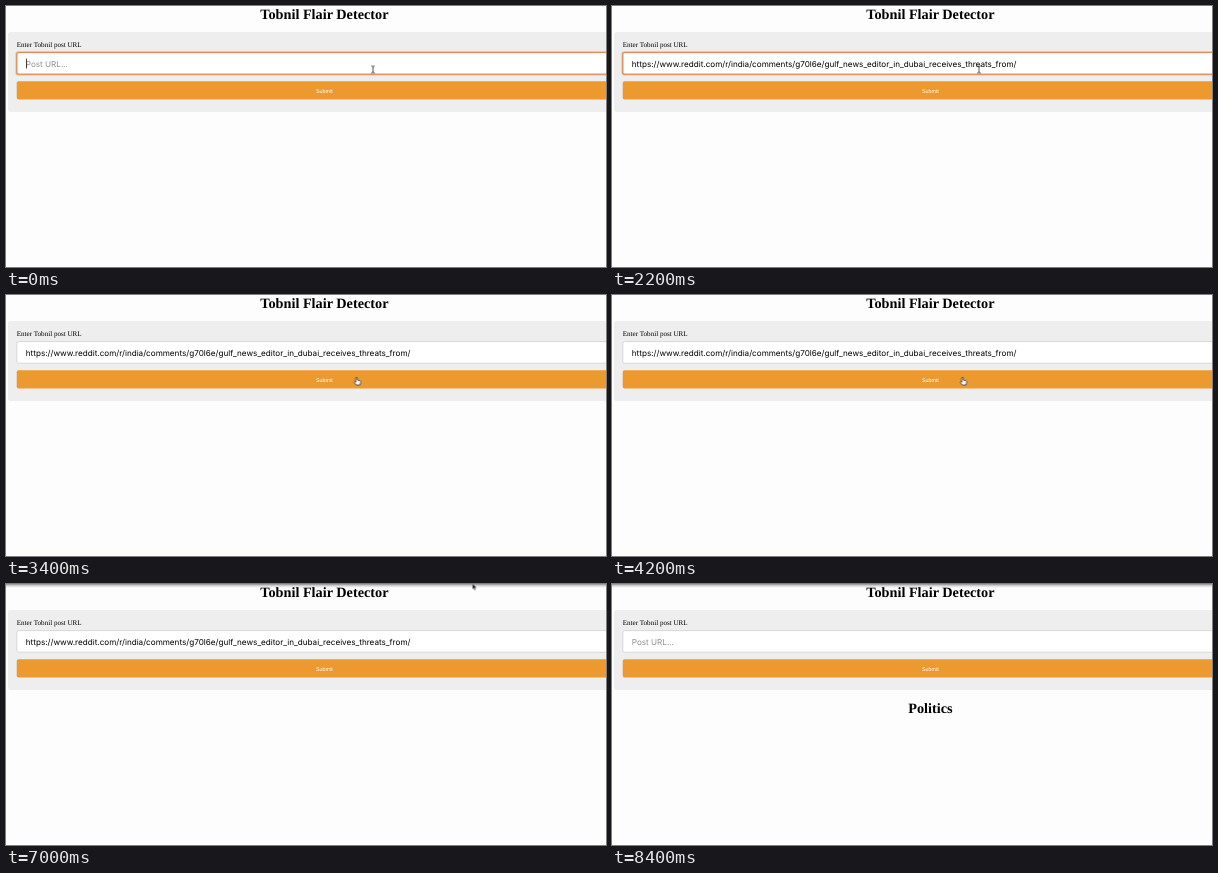
Write an HTML page that moves like this. It is 600 by 261 pixels and loops after 9100 ms.

```html
<!DOCTYPE html>
<html lang="en">
<head>
<meta charset="utf-8">
<title>Flair Detector</title>
<style>
  html, body { margin: 0; width: 100%; height: 100%; overflow: hidden; background: #fefdfe; }
  svg { display: block; width: 600px; height: 261px; }
  text { text-rendering: geometricPrecision; }

  .title { font: bold 14.25px "Liberation Serif", Times, serif; text-anchor: middle; }
  .label { font: 7.1px "Liberation Serif", Times, serif; }
  .field { font: 8.15px Inter, Roboto, sans-serif; }
  .button { font: 5.4px "Liberation Sans", Arial, sans-serif; text-anchor: middle; fill: #fff; }
  .hint { fill: #8e8e90; }

  /* Every state shares one 9.1 s clock and changes in hard steps. */
  .t { animation: 9.1s step-end infinite; }
  .focus { animation-name: focus; }
  .empty { animation-name: empty; }
  .filled { animation-name: filled; }
  .result { animation-name: result; }
  .caret-start { animation-name: caret-start; }
  .caret-end { animation-name: caret-end; }
  .shade { animation-name: shade; }
  .mouse { animation-name: mouse; }
  .beam { animation-name: beam; }
  .hand { animation-name: hand; }
  .arrow { animation-name: arrow; }

  @keyframes focus { 0% { opacity: 1 } 31.7%, 100% { opacity: 0 } }
  @keyframes empty { 0%, 79% { opacity: 1 } 17.5% { opacity: 0 } 100% { opacity: 1 } }
  @keyframes filled { 0%, 79%, 100% { opacity: 0 } 17.5% { opacity: 1 } }
  @keyframes result { 0% { opacity: 0 } 79%, 100% { opacity: 1 } }
  @keyframes caret-start { 0%, 8.7% { opacity: 1 } 3.2%, 14.1%, 100% { opacity: 0 } }
  @keyframes caret-end { 0%, 23%, 31.7%, 100% { opacity: 0 } 17.5%, 28.5% { opacity: 1 } }
  @keyframes shade { 0% { opacity: 0 } 60.3% { opacity: .25 } 61.4%, 100% { opacity: 1 } }

  @keyframes beam { 0%, 53.7% { opacity: 1 } 28.4%, 54.8%, 100% { opacity: 0 } }
  @keyframes hand { 0%, 53.7%, 100% { opacity: 0 } 29.5% { opacity: 1 } }
  @keyframes arrow { 0%, 29.5%, 92.2%, 100% { opacity: 0 } 28.4%, 76.8% { opacity: 1 } }
  @keyframes mouse {
    0% { transform: translate(367px, 63.5px) }
    27.3% { transform: translate(363px, 66px) }
    28.4% { transform: translate(356px, 74px) }
    29.5% { transform: translate(350.5px, 82px) }
    53.7% { transform: translate(371px, 53px) }
    76.8% { transform: translate(466.5px, -.5px) }
    77.9% { transform: translate(471px, 6px) }
    79% { transform: translate(475px, 11px) }
    80.1% { transform: translate(476px, 12px) }
    83.4% { transform: translate(478px, 10px) }
    85.6% { transform: translate(480px, 7px) }
    87.8% { transform: translate(482px, 4px) }
    90%, 100% { transform: translate(483px, 1px) }
  }
</style>
</head>
<body>
<svg viewBox="0 0 600 261">
  <defs>
    <linearGradient id="fade" x2="0" y2="1">
      <stop offset="0" stop-color="#777" stop-opacity=".85"/>
      <stop offset=".5" stop-color="#999" stop-opacity=".35"/>
      <stop offset="1" stop-color="#aaa" stop-opacity="0"/>
    </linearGradient>
  </defs>

  <rect width="600" height="261" fill="#fefdfe"/>
  <text class="title" x="318.4" y="12.7">Tobnil Flair Detector</text>

  <rect x="2" y="26" width="640" height="80" rx="2.5" fill="#efeeef"/>
  <text class="label" x="10.7" y="41">Enter Tobnil post URL</text>

  <rect x="10.9" y="46.6" width="620" height="21.6" rx="1.8" fill="#fff" stroke="#ccc" stroke-width=".7"/>
  <g class="t focus" fill="none" stroke="#e08f58">
    <rect x="10.4" y="46.2" width="620" height="22.4" rx="2.2" stroke-width="2.2" opacity=".4"/>
    <rect x="10.7" y="46.5" width="620" height="21.8" rx="2" stroke-width="1.1"/>
  </g>
  <text class="t field hint empty" x="19.8" y="60.5">Post URL...</text>
  <text class="t field filled" x="19.8" y="60.6">https://www.reddit.com/r/india/comments/g70l6e/gulf_news_editor_in_dubai_receives_threats_from/</text>
  <rect class="t caret-start" x="20" y="52.5" width=".7" height="10"/>
  <rect class="t caret-end" x="408.8" y="52.5" width=".7" height="10"/>

  <rect x="10.7" y="75.3" width="620" height="18.3" rx="1.8" fill="#ec9a30"/>
  <text class="button" x="318.4" y="86.5">Submit</text>

  <text class="t title result" x="318.4" y="128.5">Politics</text>
  <rect class="t shade" width="600" height="4" fill="url(#fade)"/>

  <g class="t mouse" stroke-linejoin="round" stroke-linecap="round">
    <path class="t beam" d="M-1.4-3.5Q0-3.5 0-2.6Q0-3.5 1.4-3.5M0-2.6V2.6M-1.4 3.5Q0 3.5 0 2.6Q0 3.5 1.4 3.5" fill="none" stroke="#333" stroke-width=".8"/>
    <path class="t hand" d="M-.8 4.8V.7Q0-.3.8.7V3L3.6 3.8Q4.4 4.2 4.2 5.2L3.5 8H-.3L-2.4 5.2Q-2.2 4-.8 4.8Z" fill="#fff" stroke="#222" stroke-width=".7"/>
    <path class="t arrow" d="M0 0V6L1.4 4.8L2.3 6.9L3.3 6.5L2.4 4.4H4.2Z" fill="#111" stroke="#fff" stroke-width=".4"/>
  </g>
</svg>
</body>
</html>
```
